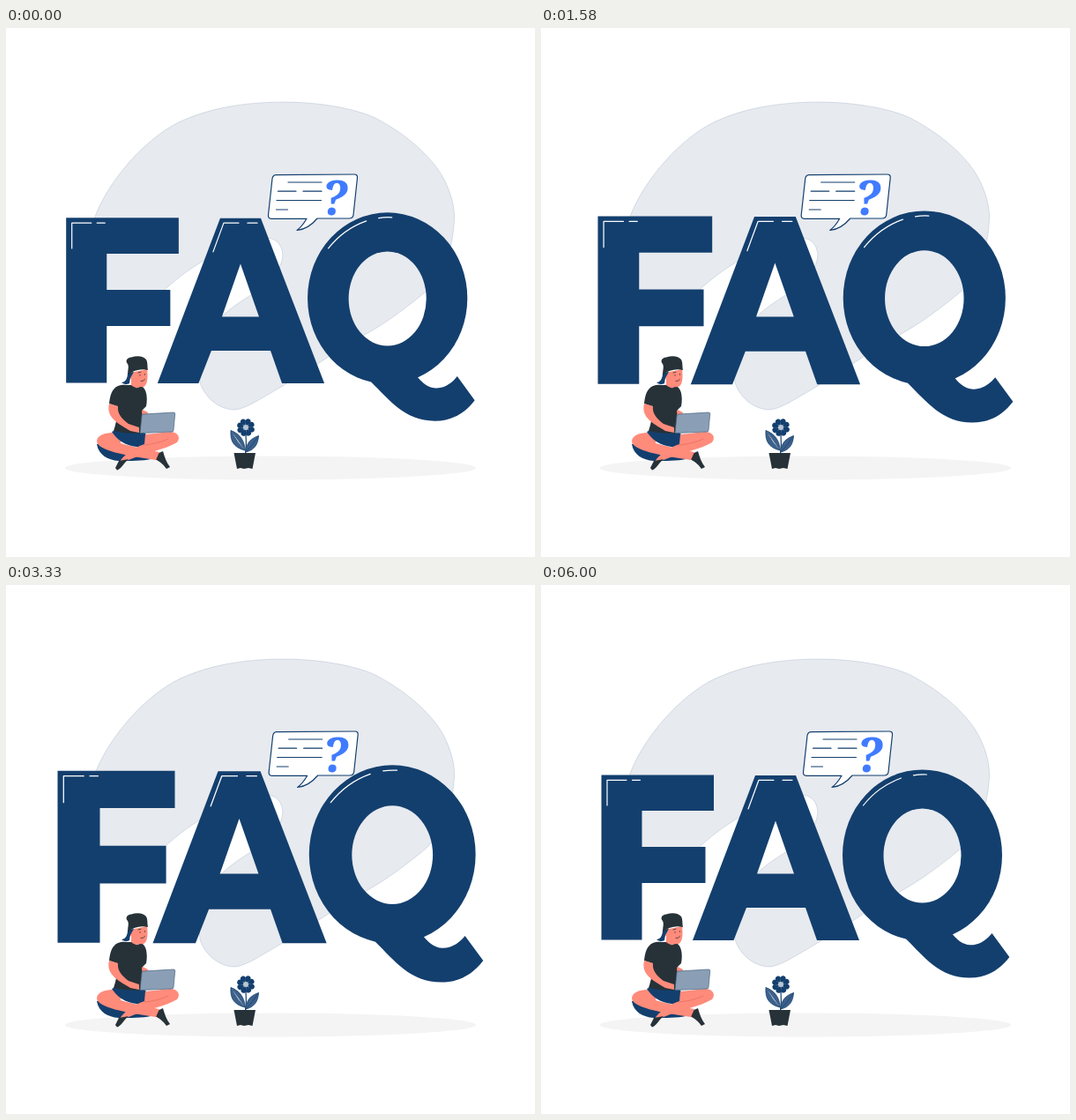
Recreate the animation shown at these times as an HTML page. Size 600 by 600 pixels, loop 6.04 s.

```html
<!DOCTYPE html>
<html lang="en">
<head>
<meta charset="utf-8">
<title>FAQ</title>
<style>
  html, body { margin: 0; width: 100%; height: 100%; overflow: hidden; background: #fff; }
  svg { display: block; width: 100%; height: 100%; }
  .navy { fill: #133f6e; }
  .dark { fill: #263238; }
  .skin { fill: #ff8b7b; }
  .line { fill: none; stroke-linecap: round; stroke-linejoin: round; }
  .ink { stroke: #133f6e; stroke-width: 1.2; }
  .shine { stroke: #fff; stroke-width: 1.2; }
  .fold { stroke: #d9685c; stroke-width: .6; }
  text { font: italic bold 54px "Noto Serif", serif; fill: #407bff; }
</style>
</head>
<body>
<svg viewBox="0 0 600 600">
  <path fill="#e7eaef" stroke="#133f6e" stroke-opacity=".35" stroke-width=".4" d="M101 214C113 181 148 134 190 110C226 91 270 84 315 84C355 84 395 91 419 102C455 121 483 146 496 170C505 187 509 203 508.500 217C507 250 497 280 475 300C445 325 420 342 390 357C355 380 320 403 290 420C270 432 262 433 258 433C240 432 225 418 220 402C217 380 225 345 246 326C265 308 285 301 300 286C310 275 316 262 313 252C310 240 300 236 285 239C255 243 215 268 195 284C175 300 150 328 125 327C95 325 84 268 101 214Z"/>
  <ellipse cx="300" cy="499" rx="233" ry="13.500" fill="#f4f4f4"/>

  <g id="letters">
    <path class="navy" d="M68.500 215.500H196V256H114.500V297H186.500V338H114.500V402.500H68.500Z"/>
    <path class="navy" fill-rule="evenodd" d="M243 216H289L361 403H313L300 366H233L218.500 403H172ZM266 267.500L245 327.500H287Z"/>
    <path class="navy" fill-rule="evenodd" d="M342 306.500a90.500 97 0 1 0 181 0a90.500 97 0 1 0-181 0ZM388.500 307a44 53.500 0 1 0 88 0a44 53.500 0 1 0-88 0Z"/>
    <path class="navy" d="M414 401.500L430 380L462 390L467.500 397C472 402 478 408 487 408.300C496 408.500 504 404 511.500 395L531.300 422C520 437 505 445.500 486 445.500C452 445.500 435 422 414 401.500Z"/>
    <path class="line shine" d="M75 250V221.300H97M103.500 221.300H112.500M235 254L247 221.300H264M274 221.300H285M365.500 250Q383 228 408.500 219M422.500 215.800Q430 214.500 437.500 215"/>
  </g>

  <g id="bubble">
    <path class="ink" fill="#fff" stroke-linejoin="round" d="M306 166.600L395 166Q399 166 398.500 170L394 212Q393.500 216 389 216H353Q343 228 330 229.500Q336 225 341 216.300H301Q297 216 297.500 212L302 171Q302.500 167 306 166.600Z"/>
    <path class="line ink" d="M320 175H358M308.500 185.200H329M337 185.200H358M307 195.500H357.500M306.500 206H319.500"/>
    <text x="358" y="211.500">?</text>
  </g>

  <g id="person">
    <path class="navy" d="M103 472C105 484 115 490 128 491C140 491 155 491 164 489L165 482L110 470Z"/>
    <path class="dark" d="M169 484L178 480C180 487 182 493 186 498L182 500C178 494 173 491 169 489Z"/>
    <path class="skin" d="M130 459C112 458 103 462 103 469C104 479 135 485 170 490L174 481C155 478 142 474 130 471Z"/>
    <path class="navy" d="M124 456L157 459L161 463L156 475C143 476 129 472 120 458Z"/>
    <path class="skin" d="M158 461L187 458C196 459 198 465 194 470C181 478 157 482 139 490L129 492C133 485 144 476 157 472Z"/>
    <path class="line fold" d="M157 473C168 472 178 469 184 466"/>
    <path class="dark" d="M128 491L139 489C133 494 131 500 126 501.500L124 499Z"/>
    <path class="skin" d="M153 432L161 436L160 439H152ZM142 398H152V407Q147 411 142 407Z"/>
    <path class="dark" d="M127 406C131 404 137 405 142 405C147 409 150 409 153 406C159 408 161 418 159 429L154 434L156 459C145 461 132 459 122 457C126 445 127 436 126 429L117 426C118 417 120 409 127 406Z"/>
    <path class="skin" d="M117 426L127 429C126 437 131 443 139 449L151 453V459L141 457C128 449 113 442 117 426Z"/>
    <path fill="#8a9fb6" stroke="#48627f" stroke-width=".7" stroke-linejoin="round" d="M156 438L190 436Q192 436 191.700 438L190 456Q190 458 188 458L152 459.500L154 440Q154 438 156 438Z"/>
    <path class="skin" d="M141 391L160 387C161 396 161 404 156 407C150 408 146 404 143 399C139 397 138 392 141 391Z"/>
    <path class="navy" d="M138 391C138 398 135 402 131 402C134 404.500 138 404.500 140 403L141 397L145 390Z"/>
    <path class="line" stroke="#263238" stroke-width=".8" d="M152 393.500v.8M157.500 392.500v.8M150 391l3-.8M153 400.500Q156 401 157.500 398.500"/>
    <path class="dark" d="M138.500 393C137.500 388 140 385 138 381C135 378 137 374 142 373.500C149 371 156 372 159 376C161 380 160 383 161 388C153 386 145 388 138.500 393Z"/>
  </g>

  <g id="plant">
    <path class="line ink" d="M272 460Q273 472 271.500 483"/>
    <path fill="#3c608a" stroke="#133f6e" stroke-width=".7" d="M271 479C258 476 254 468 255 456.500C265 460 271 468 271 479ZM272 481C272 470 279 465 286.500 462.500C286 473 281 479 272 481ZM255 456.500Q262 470 271 479M286.500 462.500Q280 473 272 481"/>
    <g id="petals" class="navy"></g>
    <circle cx="272" cy="453" r="3" fill="#b8c5d4"/>
    <path class="dark" d="M258.500 482H283L279.500 500L275 499L270 500L266 499L262 500Z"/>
  </g>
</svg>
<script>
  const $ = id => document.getElementById(id);
  const LOOP = 6040, FPS = 24;

  // Keyframes as [tenths of 6 s, value] pairs.
  const beat = [[0, 1], [1, 1.1], [3, 1], [4, 1], [5, 1.1], [6, 1], [10, 1]];
  const shake = [0, -1, 2, -4, 4, -4, 4, -4, 2, -1, 0].map((v, i) => [i, v * 1.2]);

  function at(keys, p) {
    const i = Math.max(1, keys.findIndex(k => k[0] >= p));
    const [[p0, v0], [p1, v1]] = [keys[i - 1], keys[i]];
    return v0 + (v1 - v0) * (p - p0) / (p1 - p0);
  }

  for (let a = 0; a < 360; a += 45) {
    $('petals').innerHTML +=
      `<path d="M272 452L269 446.500C268 441.500 276 441.500 275 446.500Z" transform="rotate(${a + 20} 272 453)"/>`;
  }

  const start = performance.now();
  function draw() {
    const t = (performance.now() - start) % LOOP;
    const step = Math.floor((t + 5) * FPS / 1000);
    const p = Math.min(10, (step / FPS + 0.008) / 0.6);
    const s = at(beat, p);
    $('letters').setAttribute('transform',
      `translate(300 327.500) scale(${s}) translate(-300 -327.500)`);
    $('bubble').setAttribute('transform', `translate(${at(shake, p)} 0)`);
    requestAnimationFrame(draw);
  }
  draw();
</script>
</body>
</html>
```
